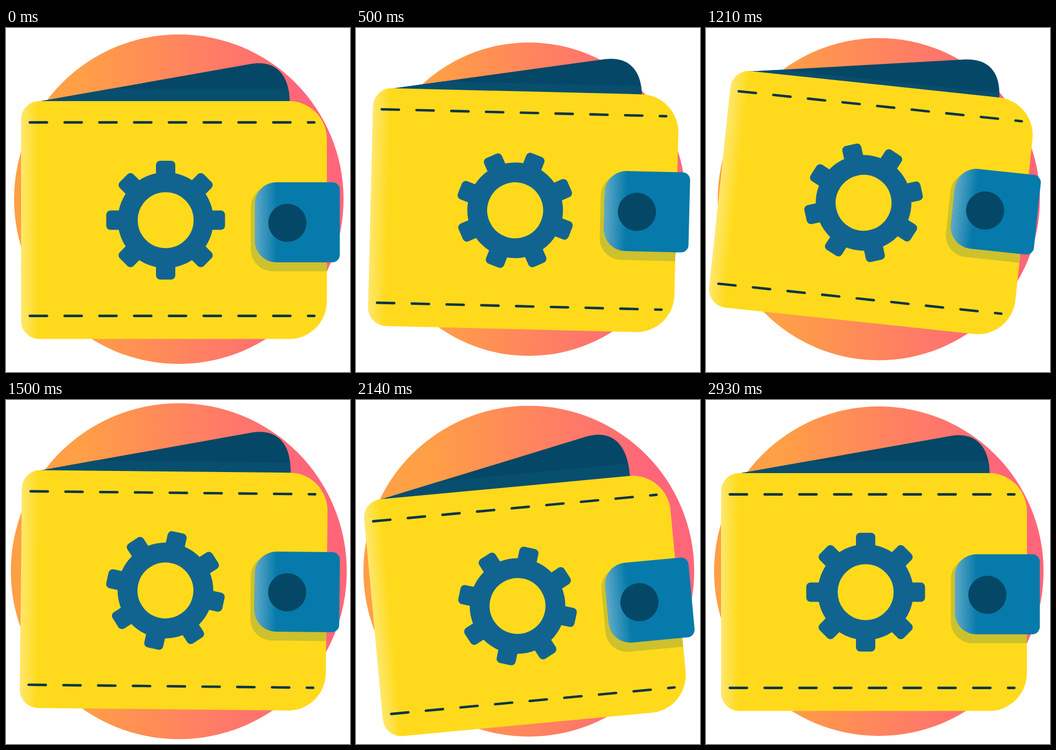
An HTML page for the animation above (3000 ms loop, 640 by 640 pixels).

```html
<!DOCTYPE html>
<html lang="en">
<head>
<meta charset="utf-8">
<title>Wallet</title>
<style>
  html, body { margin: 0; width: 100%; height: 100%; overflow: hidden; background: #fff; }
  svg { display: block; width: 100%; height: 100%; }
</style>
</head>
<body>
<svg viewBox="0 0 640 640">
  <defs>
    <linearGradient id="sunset" x1=".2" x2=".87">
      <stop offset="0" stop-color="#ff9f46"/>
      <stop offset="1" stop-color="#ff667a"/>
    </linearGradient>
    <linearGradient id="shine">
      <stop offset="0" stop-color="#fff" stop-opacity=".36"/>
      <stop offset="1" stop-color="#fff" stop-opacity="0"/>
    </linearGradient>
    <path id="leather" d="M62 136H527A70 71 0 0 1 597 207V508A70 70.5 0 0 1 527 578.5H62A34 34 0 0 1 28 544.5V170A34 34 0 0 1 62 136Z"/>
    <path id="strap" d="M503 287H607A14 14 0 0 1 621 301V422A14 14 0 0 1 607 436H503A40 40 0 0 1 463 396V327A40 40 0 0 1 503 287Z"/>
    <clipPath id="leatherClip"><use href="#leather"/></clipPath>
    <clipPath id="strapClip"><use href="#strap"/></clipPath>
    <clipPath id="cardClip">
      <path id="card" d="M58 137.3L456 66.8C503 59 527.5 88 527.5 137V190H75Z"/>
    </clipPath>
  </defs>

  <circle id="disc" cx="321.5" cy="318.5" fill="url(#sunset)"/>

  <g id="wallet">
    <g clip-path="url(#cardClip)">
      <rect y="20" width="640" height="200" fill="#054766"/>
      <rect id="band" width="640" height="120" fill="#084e6f"/>
    </g>

    <use href="#leather" fill="#ffda1c"/>
    <g clip-path="url(#leatherClip)">
      <rect x="28" y="136" width="32" height="443" fill="url(#shine)"/>
      <path id="shadow" fill="#065c72" fill-opacity=".2"
            d="M495.500 293H640V452.500H495.500A40 40 0 0 1 455.500 412.500V333A40 40 0 0 1 495.500 293Z"/>
    </g>

    <path d="M44.300 175.600H573.700M44.300 535.600H573.700" stroke="#0a3447" stroke-width="4.6"
          stroke-linecap="round" stroke-dasharray="32 32.700"/>

    <g id="gear" fill="#126490">
      <circle cx="297" cy="357.500" r="70.500" fill="none" stroke="#126490" stroke-width="37"/>
    </g>

    <g id="clasp">
      <use href="#strap" fill="#067aaa"/>
      <rect x="463" y="287" width="41" height="149" fill="url(#shine)" clip-path="url(#strapClip)"/>
      <circle cx="523.500" cy="362.500" r="35.500" fill="#054766"/>
    </g>
  </g>
</svg>

<script>
const LOOP = 3000, STEPS = 42, LAST = STEPS - 1;
const el = id => document.getElementById(id);
const move = (id, transform) => el(id).setAttribute('transform', transform);

// Key poses, all sharing one set of step positions.
const keys = [0, 7, 11, 14, 17, 21, 26, 28, 34, 37.5, 41];
const poses = {
  radius: [306.5, 291.5, 251.5, 257, 299.7, 312.5, 311, 310, 303.5, 313.5, 306.5],
  tilt:   [0, 1.4, 4.4, 6.9, 6.05, 0.6, -5.9, -6.1, -2.3, -0.8, 0],
  lift:   [0, -18, -40.2, -46, -31, -3, 27, 28, 11, 4, 0],
  clasp:  [0, -7.7, -18.4, -20.5, -14.6, -4, 8.6, 9.5, 6.5, 3, 0],
  card:   [0, 0.8, 2.25, 2.3, 0.8, -0.7, -2, -2, -0.4, -0.1, 0]
};

// Monotone cubic interpolation: flat at the ends and at every peak.
function sample(values, n) {
  const slope = i => (values[i + 1] - values[i]) / (keys[i + 1] - keys[i]);
  const tangent = i => {
    if (i === 0 || i === keys.length - 1) return 0;
    const a = slope(i - 1), b = slope(i);
    return a * b > 0 ? 2 * a * b / (a + b) : 0;
  };
  let i = 0;
  while (i < keys.length - 2 && n >= keys[i + 1]) i++;
  const span = keys[i + 1] - keys[i];
  const x = (n - keys[i]) / span, y = 1 - x;
  return values[i] * y * y * (1 + 2 * x) + values[i + 1] * x * x * (3 - 2 * x)
       + span * x * y * (tangent(i) * y - tangent(i + 1) * x);
}

// cubic-bezier(.473, 0, .359, 1), solved by bisection
function ease(x) {
  let low = 0, high = 1, s = 0.5;
  for (let k = 0; k < 24; k++) {
    s = (low + high) / 2;
    const bx = 3 * 0.473 * s * (1 - s) ** 2 + 3 * 0.359 * s * s * (1 - s) + s ** 3;
    if (bx < x) low = s; else high = s;
  }
  return s * s * (3 - 2 * s);
}

for (let angle = 0; angle < 360; angle += 45) {
  const tooth = document.createElementNS('http://www.w3.org/2000/svg', 'rect');
  const attributes = { x: 279, y: 247, width: 36, height: 36, rx: 8,
                       transform: `rotate(${angle} 297 357.5)` };
  for (const name in attributes) tooth.setAttribute(name, attributes[name]);
  el('gear').append(tooth);
}

function draw(time) {
  const n = Math.floor((time % LOOP + 5) / LOOP * STEPS) % STEPS;
  const pose = {};
  for (const name in poses) pose[name] = sample(poses[name], n);

  el('disc').setAttribute('r', pose.radius);
  move('wallet', `translate(${-0.62 * pose.tilt} ${pose.lift}) rotate(${pose.tilt} 309 356)`);
  move('card', `rotate(${pose.card} 60 137)`);
  move('clasp', `translate(0 ${pose.clasp})`);
  move('shadow', `translate(0 ${pose.clasp})`);
  move('gear', `rotate(${360 * ease(n / LAST)} 297 357.5)`);
  el('band').setAttribute('y', 113 - Math.min(0, pose.clasp));
}

const start = performance.now();
function tick() {
  draw(performance.now() - start);
  requestAnimationFrame(tick);
}
tick();
</script>
</body>
</html>
```
